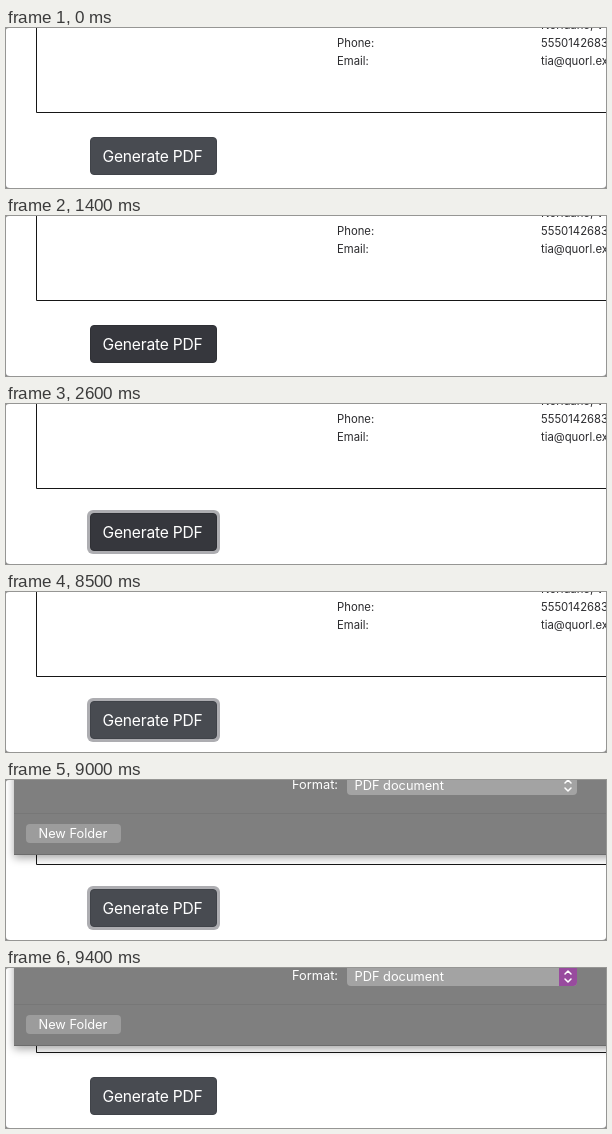
Write an HTML page that moves like this. It is 600 by 160 pixels and loops after 9.7 s.

```html
<!DOCTYPE html>
<html lang="en">
<head>
<meta charset="utf-8">
<title>Generate PDF</title>
<style>
  html, body { margin: 0; width: 100%; height: 100%; overflow: hidden; background: #fff; }
  svg { display: block; width: 600px; height: 160px; }
  text { font-family: Inter, Roboto, sans-serif; }
  .page { font-size: 11.3px; fill: #2b2b2e; }
  .panel { font-size: 12.8px; fill: #fff; }
  .label { font-size: 15.6px; letter-spacing: -.2px; fill: #fff; }
  .arrows { fill: none; stroke: #fff; stroke-width: 1.5; stroke-linecap: round; stroke-linejoin: round; }
</style>
</head>
<body>
<svg viewBox="0 0 600 160">
  <defs>
    <filter id="shadow" filterUnits="userSpaceOnUse" x="-30" y="-60" width="700" height="180">
      <feDropShadow dx="0" dy="3" stdDeviation="4" flood-color="#000" flood-opacity=".35"/>
    </filter>
  </defs>

  <g class="page">
    <text x="535" y="1">Noridane, VT</text>
    <text x="331" y="19">Phone:</text>
    <text x="535" y="19">5550142683</text>
    <text x="331" y="37">Email:</text>
    <text x="535" y="37">tia@quorl.example</text>
  </g>
  <path d="M30.5 -2V84.5H602" fill="none" stroke="#161616"/>

  <rect id="ring" x="81" y="106" width="133" height="44" rx="6" fill="#adadb1"/>
  <rect id="button" x="84.5" y="109.5" width="126" height="37" rx="3.5"/>
  <text class="label" x="96.5" y="134">Generate PDF</text>

  <g id="dialog" class="panel">
    <rect x="8" y="-40" width="620" height="118" fill="#7f7f7f" filter="url(#shadow)"/>
    <path d="M8 36.5H600" stroke="#777"/>
    <path d="M8 77.5H600" stroke="#6c6c6c"/>
    <text x="286" y="12">Format:</text>
    <rect x="341" y="-3" width="230" height="21" rx="4" fill="#a3a3a3"/>
    <path id="stepper" d="M553 -3H567a4 4 0 0 1 4 4V14a4 4 0 0 1 -4 4H553Z" fill="#984b9e"/>
    <path class="arrows" d="M559 6l3 -3l3 3M559 11l3 3l3 -3"/>
    <text x="348.5" y="12.5">PDF document</text>
    <rect x="20" y="47" width="95" height="19" rx="4" fill="#9c9c9c"/>
    <text x="32.5" y="61">New Folder</text>
  </g>

  <path d="M0 0H3Q0 0 0 2ZM0 157Q0 160 4 160H0ZM600 157Q600 160 596 160H600Z" fill="#8c8c8c"/>
</svg>
<script>
  const LOOP = 9700, STEP = 100;
  const [ring, button, dialog, stepper] =
    ['ring', 'button', 'dialog', 'stepper'].map(id => document.getElementById(id));
  const ramp = (t, from, to) => Math.min(1, Math.max(0, (t - from) / (to - from)));

  function dialogOffset(t) {
    if (t < 8900) return -120;
    if (t < 9000) return -77;
    return -3 * (1 - ramp(t, 9000, 9200)) ** 1.5;
  }

  function draw(now) {
    const t = Math.floor(now % LOOP / STEP) * STEP;
    const hover = t >= 1400 && t < 8500;
    button.setAttribute('fill', hover ? '#36373d' : '#484b51');
    button.setAttribute('stroke', hover ? '#2f3035' : '#404349');
    ring.setAttribute('opacity', ramp(t, 2300, 2600) - ramp(t, 9000, 9200));
    dialog.setAttribute('transform', `translate(0 ${dialogOffset(t)})`);
    stepper.setAttribute('visibility', t >= 9400 ? 'visible' : 'hidden');
  }

  const start = performance.now();
  function tick() {
    draw(performance.now() - start);
    requestAnimationFrame(tick);
  }
  tick();
</script>
</body>
</html>
```
